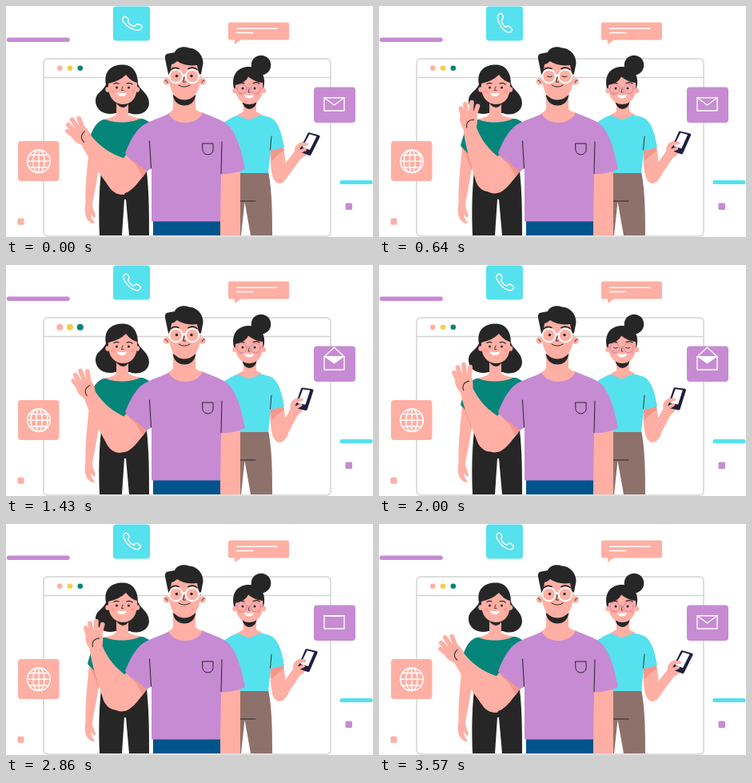
These frames come from a looping animation (459x289 px, 3640 ms). An HTML page:

```html
<!DOCTYPE html>
<html lang="en">
<head>
<meta charset="utf-8">
<title>Team waving hello</title>
<style>
  html, body { margin: 0; width: 100%; height: 100%; overflow: hidden; background: #fff; }
  svg { display: block; width: 459px; height: 289px; }
  .skin { fill: #ffafa3; } .shade { fill: #f5968c; } .dark { fill: #262626; } .cyan { fill: #56e1ee; }
  .purple { fill: #c78bd3; } .teal { fill: #04857a; } .white { fill: #fff; }
  .line { fill: none; stroke: #262626; stroke-linecap: round; stroke-linejoin: round; }
  .chalk { fill: none; stroke: #fff; stroke-width: 1.4; stroke-linejoin: round; stroke-linecap: round; }
  .limb { fill: none; stroke: #ffafa3; stroke-linecap: round; stroke-linejoin: round; }
  .blush { fill: #ff9d93; }
</style>
</head>
<body>
<svg viewBox="0 0 459 289">
  <!-- window -->
  <rect x="47" y="66" width="359" height="222" rx="5" fill="#fff" stroke="#d4d4d4" stroke-width="1.5"/>
  <path d="M47 89.5H406" stroke="#d4d4d4" stroke-width="1.5"/>
  <g id="dots">
    <circle cx="67.3" cy="77.7" r="3.3" class="skin"/>
    <circle cx="80" cy="77.7" r="3.3" fill="#f1cf4c"/>
    <circle cx="92.8" cy="77.7" r="3.3" class="teal"/>
  </g>

  <!-- decoration -->
  <path d="M3.5 42.3H77" stroke="#c78bd3" stroke-width="5.5" stroke-linecap="round"/>
  <path d="M420 220.5H456" stroke="#56e1ee" stroke-width="5.2" stroke-linecap="round"/>
  <rect x="424.5" y="246.5" width="8.5" height="8.5" rx="1.5" class="purple"/>
  <rect x="14.5" y="265.7" width="8" height="8" rx="1.5" class="skin"/>

  <!-- call -->
  <rect x="134" y=".5" width="46" height="43" rx="4" class="cyan"/>
  <path id="call" class="chalk" d="M150.500 11.500C147 13 146.500 16 149 20C152 25 157 29.500 162 31C165 31.800 167.500 30 167.800 27.500C167.800 26 163.500 23.500 162 24C160.500 24.300 160.500 26 159.300 25.800C157 25 153.500 21.500 153 19.300C152.800 18 154.500 17.500 154.300 16C154 14.500 152 11.500 150.500 11.500Z"/>

  <!-- message -->
  <path class="skin" d="M280 20.500H352Q354 20.500 354 22.500V40.500Q354 42.500 352 42.500H293.500L286 48V42.500H280Q278 42.500 278 40.500V22.500Q278 20.500 280 20.500Z"/>
  <path class="chalk" stroke-width="1" d="M288.500 28.300H339M288.500 33.500H309"/>

  <!-- mail -->
  <rect x="385" y="101.500" width="52" height="44.500" rx="4" class="purple"/>
  <path id="letter" class="white"/>
  <path class="chalk" d="M398 114.800H423V131H398Z"/>
  <path id="flap" class="chalk"/>

  <!-- globe -->
  <rect x="15" y="169" width="51.500" height="50" rx="4" class="skin"/>
  <circle cx="41" cy="194.300" r="14.300" class="chalk"/>
  <path class="chalk" d="M26.700 194.300H55.300M29 186.500H53M29 202H53"/>
  <path id="meridians" class="chalk"/>

  <!-- woman on the left -->
  <path class="dark" d="M125 98C122 81 132 73.500 146 73.500C159 73.500 165 84 165 97C167 105 179 109 179 122C178 134 165 138 155 134H137C122 138 111 129 112 117C113 108 122 106 125 98Z"/>
  <path class="skin" d="M104 176L117 184C117 207 111 230 108 248C108 254 111 257 112 263L110 265L106 260C106 264 108 268 111 271Q109 273 106 271C98 266 98 256 99.500 247C99 220 102 200 104 176Z"/>
  <path class="shade" d="M104 176L117 184L116 207Q111 190 104 176Z"/>
  <path class="teal" d="M122 142L171 141C181 145 187 150 188 160L176 209H119L117 190L102 175C106 160 110 146 122 142Z"/>
  <path class="skin" d="M138 118H153V136Q159 139 168 140.500C158 147 134 147 124 141.500Q136 139 138 135Z"/>
  <path class="dark" d="M137 118.500Q145 125 155 118.500Q152 127 146 127Q139 126 137 118.500Z"/>
  <path class="dark" d="M119 207H176C179 235 179 260 179 287H154L150 242H148L145 287H117C116 260 116 235 119 207Z"/>
  <circle cx="127.500" cy="104.500" r="3.200" class="skin"/><circle cx="164" cy="104.500" r="3.200" class="skin"/>
  <path class="skin" d="M128 97Q142 94 150 86Q156 94 164 96C165 112 159 123 146 123C134 122.500 127 112 128 97Z"/>
  <path class="line" stroke-width="1.200" d="M135 97.500Q138 95.500 141 97M151 97Q155 95.500 158 98"/>
  <g class="dark"><circle cx="138.500" cy="102" r="1.500"/><circle cx="153.500" cy="102" r="1.500"/></g>
  <circle cx="133.500" cy="107" r="2.400" class="blush"/><circle cx="158.500" cy="107" r="2.400" class="blush"/>
  <path class="line" stroke-width=".8" d="M146 101L144.500 105.500H147"/>
  <path class="white" d="M139 108.500Q145 110 151 108.500Q150 113 145 113Q140 113 139 108.500Z"/>

  <!-- woman on the right -->
  <circle cx="319" cy="74" r="12.300" class="dark"/>
  <path class="dark" d="M285 103C281 86 290 75.500 305 76C319 76.500 326 88 322 103Z"/>
  <path class="skin" d="M330 180L347 176Q349 189 350 199L353 212Q348 222 341 222C332 219 331 205 330 180Z"/>
  <path class="shade" d="M331 181L347 177L347.500 181Q340 186 332 194Z"/>
  <g id="phoneArm">
    <path class="skin" d="M336 216L350 196L361 182C360 175 366 170 373 170L381 178C377 188 371 189 368 192L348 219Q341 225 336 216Z"/>
    <path d="M379.500 158.300L391.500 161.800Q393.200 162.500 392.500 164L381.500 186Q380.700 187.500 379 187L368 182.500Q366.300 181.800 367 180L377.500 159.200Q378.200 157.800 379.500 158.300Z" fill="#201d40"/>
    <path class="white" d="M379.700 160.300L388.500 163L380 180L370.500 176.800Z"/>
    <path class="limb" stroke-width="4" d="M364 178Q369 172 376 173M367 182L374 179.500"/>
  </g>
  <path d="M291 207H328C333 232 333 262 333 287H306L298.500 245L294 287H291Z" fill="#8f716c"/>
  <path class="line" stroke-width="1" d="M292 244H312"/>
  <path class="cyan" d="M270 148Q280 139 294 135.500H316L329 139C341 143 345 160 348 177L331 181L328 209H288L270 170Z"/>
  <path class="line" stroke-width=".9" d="M332 163L330.500 180"/>
  <path class="skin" d="M297 118H313V132L320 135.800L304 142.500L289 136.500L297 132Z"/>
  <path class="dark" d="M295 118.500Q304 125 314 118.500Q312 129 304 129Q297 128 295 118.500Z"/>
  <circle cx="286.500" cy="106" r="3.200" class="skin"/><circle cx="322" cy="106" r="3.200" class="skin"/>
  <path class="skin" d="M287 99Q300 96 303 88.500Q311 95 321 96C323 112 316 123 304 123C293 122.500 286 113 287 99Z"/>
  <path class="line" stroke-width="1.200" d="M290 97.500Q294 95 298 97M309 96.500Q314 94.500 317 97"/>
  <circle cx="293" cy="109.500" r="2.300" class="blush"/><circle cx="315.500" cy="109.500" r="2.300" class="blush"/>
  <g id="womanEyes" class="dark"><circle cx="296" cy="103" r="1.500"/><circle cx="311" cy="103" r="1.500"/></g>
  <path id="womanLids" class="line" stroke-width=".9" d="M293.500 103.500Q296 105 298.500 103.500M308.500 103.500Q311 105 313.500 103.500"/>
  <g fill="none" stroke="#c97fb9" stroke-width=".9"><circle cx="295" cy="103.800" r="6"/><circle cx="312" cy="103.800" r="6"/><path d="M301 103Q303.500 101.500 306 103M289 103H286M318 103H322"/></g>
  <path class="line" stroke-width=".8" d="M304 104L303 108H305"/>
  <path class="white" d="M298 111Q304 112.500 310 111Q309 115.500 304 115.500Q299 115.500 298 111Z"/>

  <!-- man -->
  <path class="skin" d="M268 208L293 204V287H268Z"/>
  <rect x="184" y="268" width="84" height="19" fill="#00548c"/>
  <path class="skin" d="M150 186L177 206C168 217 161 228 152 233Q142 237 132 230L126 222Z"/>
  <g id="forearm">
    <path class="skin" d="M105.500 150C107 168 110 178 113 190L121 219C123 225 128 231 135 232L156 215L151 190C138 180 128 168 121.500 150Z"/>
    <g id="hand">
      <path class="skin" d="M106 154C101 146 100 139 104 134L115 130L122 134Q125 143 121.500 153Q114 160 106 154Z"/>
      <path class="limb" stroke-width="5.700" d="M106 141L103 128M110 138L108.500 122.500M115 138L116.500 120.500M119 140L124 125"/>
      <path class="line" stroke-width="1" d="M110 152C109 145 113 142 119 142"/>
    </g>
  </g>
  <path class="purple" d="M206 133Q224 150 245 133C258 139 271 142 279 150C290 163 295 184 299 204Q286 210 269 210.500L268 269.500H182V203L176 207Q160 199 149 184C157 164 165 151 177 146C187 141 199 138 206 133Z"/>
  <path class="shade" d="M155 189L176 207L171 214Q164 199 155 189Z"/>
  <path class="line" stroke-width="1" d="M179.500 169L181.500 203M270 170L269 209.500M246 172H259V181Q258 185.500 252.500 186Q247 185.500 246 181Z"/>
  <path class="skin" d="M209 108H237V129Q240 132 246 133.500C240 149 210 151 203 134Q208 132 209 128Z"/>
  <path class="dark" d="M208.500 111Q223 120 237.500 111Q235 124.500 223 124.500Q211 124 208.500 111Z"/>
  <path class="dark" d="M204 90L199 66Q198 60 203 59.500L211 58C213 52 222 49.500 229 52.500C240 53 247 63 246.500 72L243 90Z"/>
  <circle cx="201" cy="94.500" r="4.300" class="skin"/><circle cx="245.500" cy="94.500" r="4.300" class="skin"/>
  <path class="line" stroke-width=".8" d="M199 93Q202 93 202 96M248 93Q245 93 245 96"/>
  <path class="skin" d="M204 88Q206 82 207 73Q211 72 214 69Q224 76 239 74Q240 82 243 88C243 103 238 117 223 117.500C209 117 204 103 204 88Z"/>
  <path class="line" stroke-width="1.700" d="M206.500 79.500Q210 76 216 78.500M228 78.500Q235 75.500 239 79.500"/>
  <g id="manEyes" class="dark"><circle cx="213.500" cy="87.500" r="1.700"/><circle cx="232" cy="87.500" r="1.700"/></g>
  <path id="manLids" class="line" stroke-width="1" d="M210.500 88Q213.500 90 216.500 88M229 88Q232 90 235 88"/>
  <g class="chalk" style="stroke-width:1.900"><circle cx="212.500" cy="88" r="8.300"/><circle cx="233" cy="88" r="8.300"/><path d="M221 87Q223 85.500 224.700 87M204 87L201 86M241.500 87L245 86"/></g>
  <path class="line" stroke-width="1" d="M223 89L221.500 95H224.500M216 99Q223 103.500 230 99"/>
</svg>
<script>
const LOOP = 3640, FRAMES = 51;
const $ = id => document.getElementById(id);
const set = (id, name, value) => $(id).setAttribute(name, value);
const clamp = x => Math.max(0, Math.min(1, x));
const ramp = (t, from, to) => clamp((t - from) / (to - from));
const ease = (t, from, to) => { const x = ramp(t, from, to); return x * x * (3 - 2 * x); };
const swing = phase => (1 - Math.cos(phase * 2 * Math.PI)) / 2;
const scaleAt = (x, y, sx, sy) => `translate(${x} ${y}) scale(${sx} ${sy}) translate(${-x} ${-y})`;

function blink(who, y, t, ...times) {
  const shut = Math.max(...times.map(at => clamp(1.6 - Math.abs(t - at) / 90)));
  set(who + 'Eyes', 'transform', scaleAt(0, y, 1, 1 - shut));
  set(who + 'Lids', 'opacity', shut > .6 ? 1 : 0);
}

function drawGlobe(t) {
  const shift = ramp(t, 0, 2000) * 2.5;
  let d = '';
  for (let i = 0; i < 4; i++) {
    const w = (i / 2 + shift) % 2 - 1;
    d += `M41 180A${Math.abs(w) * 14.3} 14.3 0 0 ${w > 0 ? 1 : 0} 41 208.6`;
  }
  set('meridians', 'd', d);
}

function draw(now) {
  // The scene advances at 14 pictures per second.
  const frame = Math.min(FRAMES - 1, Math.floor(now % LOOP / LOOP * FRAMES + .1));
  const phase = frame / (FRAMES - 1), t = frame * LOOP / FRAMES;

  const wave = -20 * (1 - swing(phase * 3));
  set('forearm', 'transform', `rotate(${wave} 152 197)`);
  set('hand', 'transform', `rotate(${wave} 114 152)`);
  set('phoneArm', 'transform', `rotate(${-9.5 * swing(phase)} 343 214)`);
  const ring = t < 1170 ? -14 * Math.cos(t / 427 * 2 * Math.PI) : 0;
  set('call', 'transform', `rotate(${ring} 158 20.5) ${scaleAt(157, 21, 1.06, 1.06)}`);

  const open = ease(t, 640, 1350) - ease(t, 2500, 3140);
  const tip = 124 - 21 * open;
  set('flap', 'd', `M398 114.8L410.5 ${tip}L423 114.8`);
  set('letter', 'd', tip < 114.8 ? 'M398 114.8H423L410.5 123.5Z' : '');

  drawGlobe(t);
  blink('man', 87.5, t, 640, 2500);
  blink('woman', 103, t, 2000);
  const pulse = Math.sin(Math.PI * ramp(t, 1150, 1900));
  for (const dot of $('dots').children) dot.setAttribute('r', 3.3 + .8 * pulse);
}

function tick() {
  draw(performance.now());
  requestAnimationFrame(tick);
}
tick();
</script>
</body>
</html>
```
